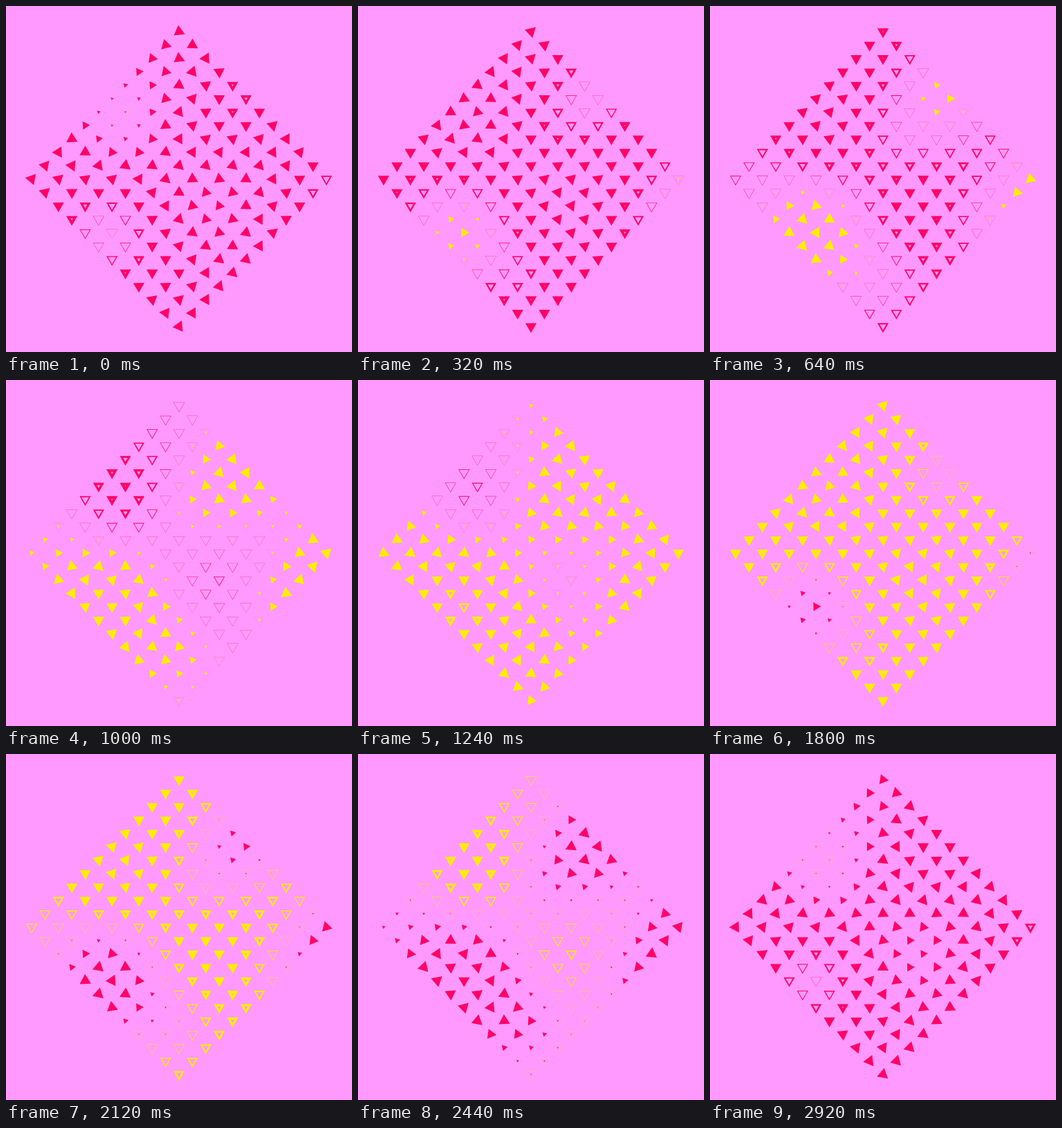
Write an HTML page with a canvas that moves like this. It is 500 by 500 pixels and loops after 3 s.

```html
<!DOCTYPE html>
<html lang="en">
<head>
<meta charset="utf-8">
<title>Triangle diamond</title>
<style>
  html, body { margin: 0; width: 100%; height: 100%; overflow: hidden; background: #ff99ff; }
  canvas { display: block; width: 500px; height: 500px; }
</style>
</head>
<body>
<canvas id="stage" width="500" height="500"></canvas>
<script>
const ctx = document.getElementById('stage').getContext('2d');
const BACK = '#ff99ff';
const COLORS = ['#ff0066', '#ffee00'];
const LOOP = 3000, CYCLE = 1500, STEP = 40, LAST = 2920;
const SIDE = 12, GAP = 213 / 11, RADIUS = 9.4, MID = 250;

// Smooth hills and dips that set how far ahead (ms) each place starts.
// u and v count half grid cells from the middle.
const BASE = 600;
const HILLS = [
  { u: -5.2, v: 4, height: 940, spread: 2.8 },
  { u: -4.5, v: -4.5, height: -500, spread: 2.8 },
  { u: 4.5, v: -6.2, height: 600, spread: 2.2 },
  { u: 11.5, v: 1, height: 800, spread: 2 },
  { u: 2, v: 2, height: -250, spread: 3 },
  { u: 8, v: 3.5, height: 300, spread: 1.8 },
  { u: -0.5, v: 7.2, height: 280, spread: 1.8 },
  { u: 1, v: -3.2, height: 230, spread: 2 },
  { u: -1, v: -10, height: -150, spread: 3 },
  { u: -10, v: -1, height: 120, spread: 2.5 }
];

const startAge = (u, v) => HILLS.reduce((sum, h) => {
  const d2 = (u - h.u) ** 2 + (v - h.v) ** 2;
  return sum + h.height * Math.exp(-d2 / (2 * h.spread ** 2));
}, BASE);

const cells = [];
for (let i = 0; i < SIDE; i++) {
  for (let j = 0; j < SIDE; j++) {
    const u = i - j, v = i + j - (SIDE - 1);
    cells.push({ x: MID + u * GAP, y: MID + v * GAP, age: startAge(u, v) });
  }
}

const progress = (age, from, to) => Math.min(1, Math.max(0, (age - from) / (to - from)));
const sine = p => (1 - Math.cos(Math.PI * p)) / 2;
const quad = p => p < 0.5 ? 2 * p * p : 1 - 2 * (1 - p) ** 2;

function trace(x, y, radius, angle) {
  for (let k = 0; k < 3; k++) {
    const a = angle + k * Math.PI * 2 / 3;
    ctx[k ? 'lineTo' : 'moveTo'](x + radius * Math.cos(a), y + radius * Math.sin(a));
  }
  ctx.closePath();
}

// A triangle grows while making a third of a turn, then hollows out to a hairline.
function drawTriangle({ x, y }, age, color) {
  const size = RADIUS * (0.08 + 0.92 * quad(progress(age, 0, 500)));
  const angle = -Math.PI / 6 + Math.PI * 2 / 3 * sine(progress(age, 0, 1000));
  const hole = 0.95 * sine(progress(age, 980, 1500));
  ctx.globalAlpha = 1 - progress(age, 1560, 1680);
  ctx.fillStyle = color;
  ctx.beginPath();
  trace(x, y, size, angle);
  if (hole > 0) trace(x, y, size * hole, angle);
  ctx.fill('evenodd');
}

function draw(time) {
  ctx.globalAlpha = 1;
  ctx.fillStyle = BACK;
  ctx.fillRect(0, 0, 500, 500);
  for (const cell of cells) {
    const total = cell.age + time;
    const turn = Math.floor(total / CYCLE);
    const age = total - turn * CYCLE;
    // The fading outline of the previous colour stays behind the new one.
    if (age < 180) drawTriangle(cell, age + CYCLE, COLORS[(turn + 1) % 2]);
    drawTriangle(cell, age, COLORS[turn % 2]);
  }
}

const start = performance.now();
function tick() {
  const time = (performance.now() - start) % LOOP;
  draw(Math.min(LAST, Math.floor(time / STEP) * STEP));
  requestAnimationFrame(tick);
}
tick();
</script>
</body>
</html>
```
